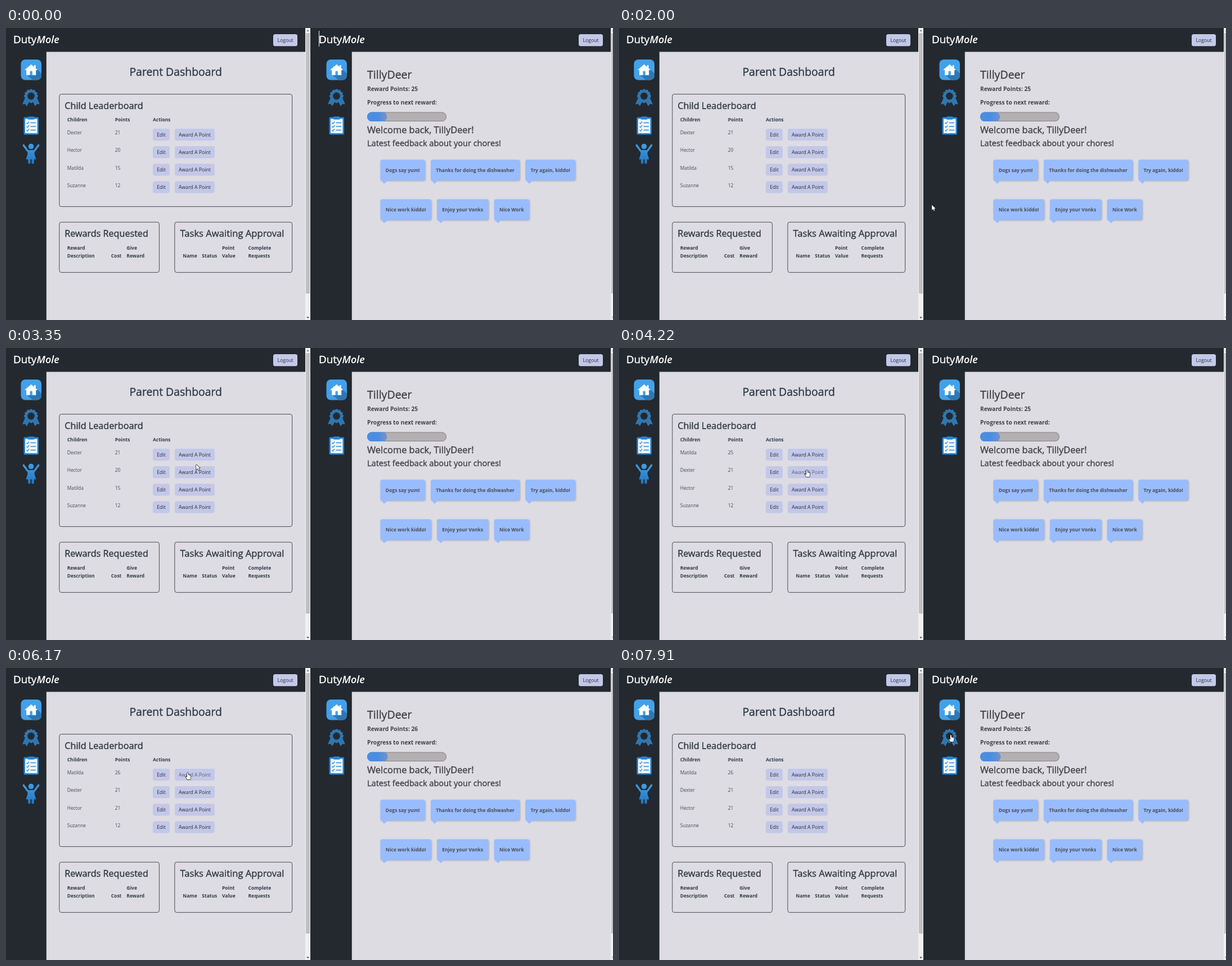
An HTML page with a canvas for the animation above (8 s loop, 1079 by 519 pixels).

```html
<!DOCTYPE html>
<html lang="en">
<head>
<meta charset="utf-8">
<title>Chore dashboard</title>
<style>
  html, body { margin: 0; width: 100%; height: 100%; overflow: hidden; background: #24292f; }
  canvas { display: block; }
</style>
</head>
<body>
<canvas id="stage" width="1079" height="519"></canvas>
<script>
const ctx = document.getElementById('stage').getContext('2d');
const LOOP = 8000, STEP = 67;
const DARK = '#24292f', PAGE = '#dddce2', LILAC = '#c3c8e9', INK = '#323c48', GREY = '#444245';
const BLUE = '#2e77b3', SKY = '#41a1eb', BUBBLE = '#98bcfe', EDGE = '#18191c';
const PAGE_SHIFT = 543, BUTTON_H = 21.3;
const rowTop = i => 179 + i * 31.1;

// Pointer travel; each move begins where the last one ended
const MOVES = [
  { from: 260, to: 260, x: 608, y: 315 },
  { from: 860, to: 1210, x: 608, y: 313, lift: 11 },
  { from: 1600, to: 2400, x: 456, y: 316 },
  { from: 2470, to: 3210, x: 338, y: 206 },
  { from: 3280, to: 3830, x: 334, y: 217 },
  { from: 4220, to: 4960, x: 325, y: 263 },
  { from: 5030, to: 5030, x: 326, y: 232 },
  { from: 5030, to: 5300, x: 323, y: 186 },
  { from: 6170, to: 6970, x: 688, y: 116 },
  { from: 7040, to: 7840, x: 590, y: 119, lift: 28 }
];

function box(x, y, w, h, fill) {
  ctx.fillStyle = fill;
  ctx.fillRect(x, y, w, h);
}

function pill(x, y, w, h, r, fill) {
  ctx.beginPath();
  ctx.roundRect(x, y, w, h, r);
  ctx.fillStyle = fill;
  ctx.fill();
}

function outline(x, y, w, h, r, color) {
  ctx.beginPath();
  ctx.roundRect(x, y, w, h, r);
  ctx.strokeStyle = color;
  ctx.lineWidth = 1;
  ctx.stroke();
}

function disc(x, y, r, fill) {
  ctx.beginPath();
  ctx.arc(x, y, r, 0, 7);
  ctx.fillStyle = fill;
  ctx.fill();
}

function trace(points) {
  ctx.beginPath();
  for (let i = 0; i < points.length; i += 2) ctx.lineTo(points[i], points[i + 1]);
}

function shape(points, fill) {
  trace(points);
  ctx.closePath();
  ctx.fillStyle = fill;
  ctx.fill();
}

function line(points, color, width) {
  trace(points);
  ctx.strokeStyle = color;
  ctx.lineWidth = width;
  ctx.stroke();
}

function at(x, y, draw, flip = 1) {
  ctx.save();
  ctx.translate(x, y);
  ctx.scale(flip, 1);
  draw();
  ctx.restore();
}

function mirrored(x, y, draw) {
  at(x, y, draw);
  at(x, y, draw, -1);
}

function setFont(size, weight) {
  ctx.font = `${weight} ${size}px "Open Sans", "Noto Sans", sans-serif`;
}

function text(label, x, y, size, weight = 400, color = INK, align = 'left') {
  setFont(size, weight);
  ctx.textAlign = align;
  ctx.fillStyle = color;
  ctx.fillText(label, x, y);
}

// Regular letters with a hairline edge give a medium weight
function heading(label, x, y, size, color = INK, align = 'left') {
  text(label, x, y, size, 400, color, align);
  ctx.strokeStyle = color;
  ctx.lineWidth = 0.4;
  ctx.strokeText(label, x, y);
}

function button(label, x, y, w, hovered) {
  pill(x, y, w, BUTTON_H, 3.5, LILAC);
  text(label, x + w / 2, y + 14, 8.7, 400, hovered ? '#5c6075' : '#292e36', 'center');
}

function panel(title, size, x, y, w, h) {
  outline(x, y, w, h, 3.5, '#484c53');
  heading(title, x + 9.5, y + 26, size);
}

function homeIcon() {
  ctx.save();
  ctx.beginPath();
  ctx.roundRect(26.5, 56, 36.5, 36.5, 8);
  ctx.clip();
  box(26, 56, 38, 37, SKY);
  shape([54, 72, 74, 92, 56, 100, 37, 83], BLUE);
  ctx.restore();
  box(50, 66, 2.6, 6, '#fff');
  mirrored(44.7, 64.5, () => shape([-0.2, 0, 11.6, 10, 8.5, 10.5, 8.5, 19.3, -0.2, 19.3], '#fff'));
  pill(42.5, 76.5, 4.4, 7.5, 1, SKY);
}

function awardIcon() {
  mirrored(44.5, 121, () => shape([2, 8, 11, 4, 15.5, 14.5, 10.5, 14, 7.5, 18], BLUE));
  for (let i = 0; i < 12; i++) {
    const a = i * Math.PI / 6;
    disc(44.5 + Math.cos(a) * 9.8, 121 + Math.sin(a) * 9.8, 2.7, BLUE);
  }
  disc(44.5, 121, 10.5, BLUE);
  disc(44.5, 121, 6.4, DARK);
}

function clipboardIcon() {
  pill(31.5, 158.5, 26.5, 31, 2, '#2386d8');
  box(34, 161.5, 21.5, 25.5, '#eef6fd');
  pill(39, 157.3, 11.5, 5.5, 1.5, '#2386d8');
  for (let y = 168.5; y < 185; y += 6.5) {
    line([36.5, y, 38.2, y + 1.6, 41.2, y - 2], '#2386d8', 1.2);
    line([43.5, y, 53, y], '#2386d8', 1.4);
  }
}

function personIcon() {
  const skin = ctx.createLinearGradient(0, 205, 0, 242);
  skin.addColorStop(0, '#3d9feb');
  skin.addColorStop(1, '#2476c2');
  disc(44.5, 210.5, 4.8, skin);
  ctx.lineCap = ctx.lineJoin = 'round';
  mirrored(44.5, 0, () => {
    line([0, 219, 6, 218.5, 13.2, 208.5], skin, 3.4);
    shape([-0.2, 217.5, 6.5, 217.5, 6, 224, 9, 233.5, -0.2, 233.5], skin);
    line([3.2, 232, 3.2, 239.5], skin, 4.2);
  });
  ctx.lineCap = 'butt';
  ctx.lineJoin = 'miter';
}

function pageFrame() {
  box(-1, 0, 533, 42.4, DARK);
  box(-1, 0, 72.8, 519, DARK);
  heading('Duty', 13, 26.5, 18.8, '#fff');
  text('Mole', 54.5, 26.5, 18, 'italic 600', '#fff');
  button('Logout', 475, 11, 43);
  homeIcon();
  awardIcon();
  clipboardIcon();
}

function scrollbar(x) {
  box(x, 0, 9, 519, '#f0f0f1');
  box(x + 1, 9, 7, 463, '#c0c0c2');
  shape([x + 2.3, 5.8, x + 4.5, 3.2, x + 6.7, 5.8], '#666');
  shape([x + 2.3, 513.5, x + 4.5, 516.2, x + 6.7, 513.5], '#444');
}

function column(x, label) {
  const lines = label.split('\n');
  lines.forEach((part, i) => text(part, x, 408 - (lines.length - 1 - i) * 13.6, 8.5, 700));
}

function parentPage(children, pointer) {
  pageFrame();
  personIcon();
  heading('Parent Dashboard', 301.7, 85, 19.4, INK, 'center');
  panel('Child Leaderboard', 16.2, 94.8, 117.6, 413.9, 199.8);
  panel('Rewards Requested', 16.15, 94.8, 345.1, 177.6, 89.3);
  panel('Tasks Awaiting Approval', 16.6, 299.9, 345.1, 208.8, 89.3);

  text('Children', 108.7, 166, 8.5, 700);
  text('Points', 193.7, 166, 8.5, 700);
  text('Actions', 261, 166, 8.5, 700);
  children.forEach(([name, points], i) => {
    const y = rowTop(i);
    text(name, 108.7, y + 10.3, 8.4, 400, '#454c55');
    text(points, 193.7, y + 10.3, 8.4, 400, '#454c55');
    button('Edit', 261, y, 30);
    button('Award A Point', 300, y, 71, pointer && awardRow(pointer) === i);
  });

  column(108.7, 'Reward\nDescription');
  column(186.7, 'Cost');
  column(214.3, 'Give\nReward');
  column(314.3, 'Name');
  column(348.3, 'Status');
  column(384, 'Point\nValue');
  column(430.5, 'Complete\nRequests');
}

function progress(points) {
  const x = 642, y = 149.5, w = 141, h = 16.5;
  const done = w * points / 100;
  const fill = ctx.createLinearGradient(x, 0, x + done, 0);
  fill.addColorStop(0, '#478fe6');
  fill.addColorStop(0.5, '#4a8ce1');
  fill.addColorStop(1, '#6f93cd');
  pill(x, y, w, h, 8, '#b4b0b1');
  outline(x + 0.5, y + 0.5, w - 1, h - 1, 7.7, 'rgba(95, 90, 98, .5)');
  pill(x, y, done, h, 8, fill);
}

function bubble(label, x, y) {
  setFont(8.55, 700);
  const w = ctx.measureText(label).width + 18.5;
  ctx.save();
  ctx.shadowColor = 'rgba(70, 70, 80, .35)';
  ctx.shadowBlur = 3;
  ctx.shadowOffsetX = ctx.shadowOffsetY = 1;
  pill(x, y, w, 36.7, 3, BUBBLE);
  ctx.restore();
  shape([x + 1, y + 36.2, x + 13, y + 36.2, x + 7, y + 42.6], BUBBLE);
  text(label, x + w / 2, y + 21.8, 8.55, 700, '#4c4d53', 'center');
  return w;
}

function bubbleRow(y, labels) {
  let x = 665.5;
  for (const label of labels) x += bubble(label, x, y) + 10.3;
}

function childPage(points) {
  at(PAGE_SHIFT, 0, pageFrame);
  heading('TillyDeer', 642, 90, 19.5, GREY);
  text('Reward Points: ' + points, 642, 111.5, 10.2, 700, GREY);
  text('Progress to next reward:', 642, 136.3, 10.2, 700, GREY);
  progress(points);
  heading('Welcome back, TillyDeer!', 642, 186.7, 16.4, GREY);
  heading('Latest feedback about your chores!', 642, 209.5, 14.55, GREY);
  bubbleRow(234.3, ['Dogs say yum!', 'Thanks for doing the dishwasher', 'Try again, kiddo!']);
  bubbleRow(304.5, ['Nice work kiddo!', 'Enjoy your Vonks', 'Nice Work']);
}

function awardRow({ x, y }) {
  const row = Math.floor((y - rowTop(0)) / 31.1);
  const inside = x >= 300 && x <= 371 && row >= 0 && row < 4 && y <= rowTop(row) + BUTTON_H;
  return inside ? row : -1;
}

function pointerAt(time) {
  let pos = null;
  for (const { from, to, x, y, lift = 0 } of MOVES) {
    if (time < from) break;
    const p = to > from ? Math.min(1, (time - from) / (to - from)) ** 1.6 : 1;
    const start = pos || { x, y };
    pos = {
      x: start.x + (x - start.x) * p,
      y: start.y + (y - start.y) * p - lift * Math.sin(Math.PI * p)
    };
  }
  return pos;
}

function outlined(points) {
  ctx.lineJoin = 'round';
  line([...points, points[0], points[1]], EDGE, 1.4);
  shape(points, '#fff');
  ctx.lineJoin = 'miter';
}

const arrow = () => outlined([0.3, 0.5, 0.3, 9.6, 2.5, 7.7, 4.1, 11, 5.6, 10.3, 4.1, 7.2, 7, 7]);
const hand = () => outlined([-1, 0.3, 0.7, 0.3, 0.9, 4, 5.6, 5.2, 4.6, 12, -0.8, 12, -3.8, 7.2, -1, 8]);

function beam() {
  line([0, -4.5, 0, 4.5], '#222', 1.3);
  for (const y of [-4.5, 4.5]) line([-2.8, y, 2.8, y], '#222', 1);
}

function drawPointer(pointer) {
  const { x, y } = pointer;
  const overText = x > 642 && x < 733 && y > 100 && y < 114;
  const overIcon = x > 572 && x < 603 && y > 107 && y < 140;
  at(x, y, overText ? beam : overIcon || awardRow(pointer) >= 0 ? hand : arrow);
}

function childrenAt(time) {
  if (time < 3700) return [['Dexter', 21], ['Hector', 20], ['Matilda', 15], ['Suzanne', 12]];
  return [['Matilda', time < 5710 ? 25 : 26], ['Dexter', 21], ['Hector', 21], ['Suzanne', 12]];
}

function render(now) {
  const time = now % LOOP;
  const pointer = pointerAt(Math.floor((time + 15) / STEP) * STEP);

  box(0, 0, 1079, 519, PAGE);
  parentPage(childrenAt(time), pointer);
  scrollbar(532);
  box(541, 0, 2, 519, DARK);
  childPage(time < 5770 ? 25 : 26);
  scrollbar(1075);
  if (pointer) drawPointer(pointer);
  else box(556, 5, 1, 28, '#e8e9eb');
}

function frame(now) {
  render(now);
  requestAnimationFrame(frame);
}
requestAnimationFrame(frame);
</script>
</body>
</html>
```
